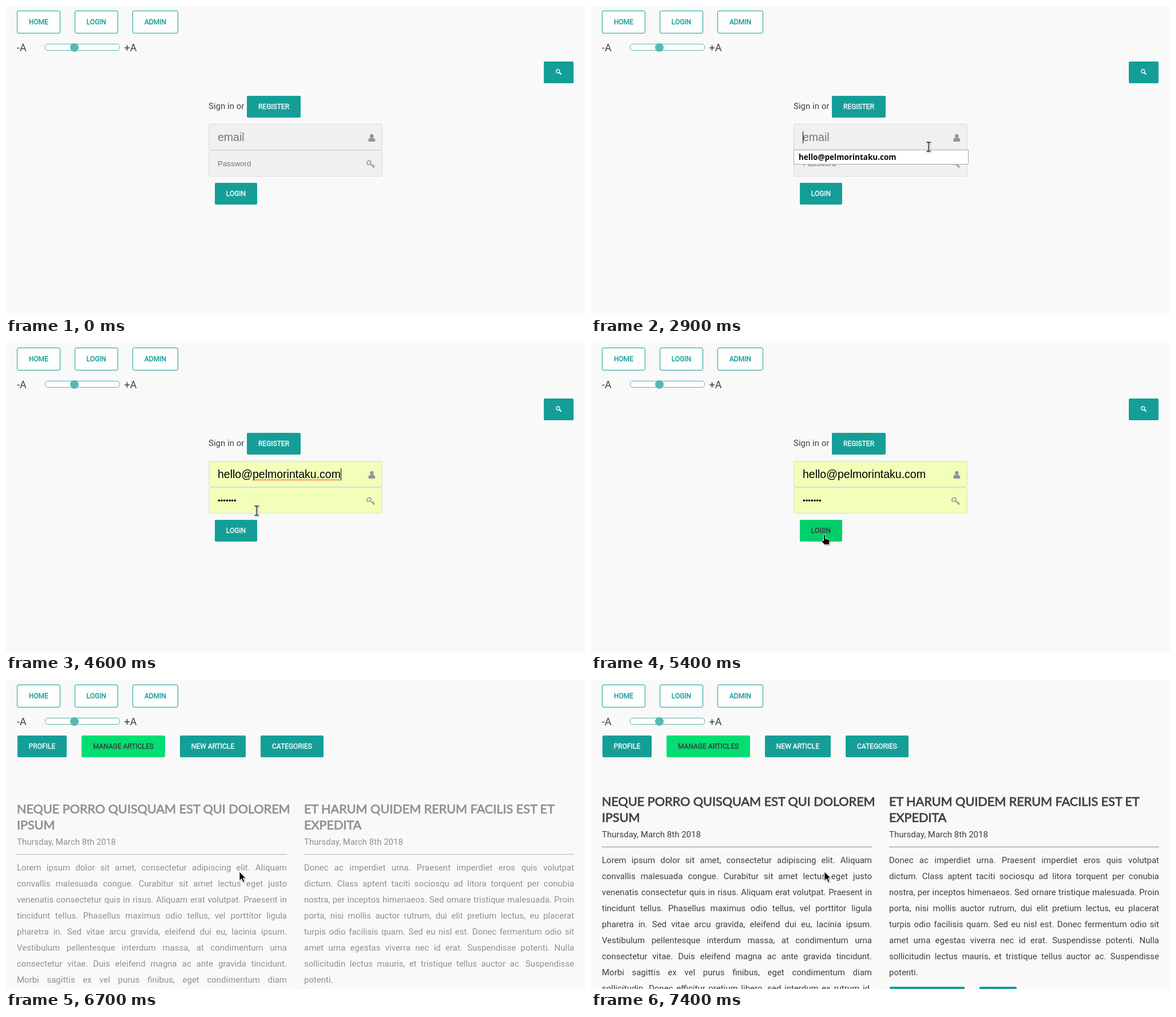
Write an HTML page that moves like this. It is 1012 px wide and 540 px high and loops after 8000 ms.

```html
<!DOCTYPE html>
<html lang="en">
<head>
<meta charset="utf-8">
<title>Sign in</title>
<style>
  :root { --teal: #159e98; --green: #02de73; --ink: #404040; }
  html, body { margin: 0; width: 100%; height: 100%; overflow: hidden; background: #f9f9f9; }
  #stage { position: relative; width: 1012px; height: 540px; overflow: hidden; background: #f9f9f9;
    font: 15px Roboto, sans-serif; color: var(--ink); }
  #stage div, #stage svg { position: absolute; box-sizing: border-box; }
  #stage svg { overflow: visible; }
  .page { left: 0; top: 0; width: 1012px; height: 540px; }
  .mid { display: flex; align-items: center; white-space: pre; }
  .btn { display: flex; align-items: center; justify-content: center; height: 38px; border-radius: 2px;
    background: var(--teal); color: #f9f9f9; font-size: 12px; white-space: pre; -webkit-text-stroke: .4px; }
  .line { height: 40px; border: 1px solid var(--teal); border-radius: 3px; background: #fefefe; color: var(--teal); }
  .active { background: var(--green); color: var(--ink); }
  .field { left: 354px; width: 304px; height: 46px; border: 1px solid #dadada; border-radius: 3px;
    padding-left: 15px; font-family: "Liberation Sans", Arial, sans-serif; }
  #list { left: 354px; top: 251px; width: 306px; height: 26px; border: 1px solid #a0a9b8; padding-left: 8px;
    font: bold 13.5px "Noto Sans", sans-serif; color: #0a0a0a; }
  #caret { top: 219px; width: 1px; height: 21px; background: #000; }
  .head { height: 28px; font: 21.6px/28px Lato, sans-serif; white-space: pre; -webkit-text-stroke: .8px; }
  .text { width: 472px; height: 28px; line-height: 28px; text-align: justify; text-align-last: justify; }
  .text.end { text-align-last: left; }
  .rule { width: 472px; height: 2px; border-top: 1px solid #9a9a9a; border-bottom: 1px solid #dedede; }
  .dot { width: 10px; height: 10px; border-radius: 50%; background: var(--teal); }
</style>
</head>
<body>
<div id="stage">
  <div class="mid" style="left:19px;top:60px;height:24px;font-size:18px">-A</div>
  <div style="left:68px;top:66px;width:131px;height:12px;border:1px solid #56b7b3;border-radius:5px;background:#fefefe"></div>
  <div style="left:112px;top:65px;width:15px;height:15px;border-radius:50%;background:#56b8b4"></div>
  <div class="mid" style="left:206.5px;top:60px;height:24px;font-size:18px">+A</div>

  <div class="page" id="login">
    <div class="mid" style="left:354px;top:163px;height:24px">Sign in or</div>
    <div class="field mid" id="mail" style="top:206px;font-size:19.5px"></div>
    <div class="field mid" id="pass" style="top:252px;font-size:13.333px"></div>
    <svg width="1012" height="540">
      <g fill="#8f979b">
        <ellipse cx="639.3" cy="227.4" rx="3.2" ry="3.6"/>
        <path d="M633.2 235.2q0-4.2 3.4-4.7q2.7 1.6 5.4 0q3.4.5 3.4 4.7q0 1.8-1.8 1.8h-8.6q-1.8 0-1.8-1.8z"/>
      </g>
      <g fill="none" stroke="#8f979b" stroke-width="1.7">
        <ellipse cx="634.3" cy="273.6" rx="3.9" ry="2.9" transform="rotate(-40 634.3 273.6)"/>
        <path d="M636.8 275.8L643.8 282.6M640.2 279l2-2M642.2 281l2-2"/>
      </g>
      <path id="wave" fill="none" stroke="#f33" stroke-width="1"/>
    </svg>
    <div class="mid" id="list">hello@pelmorintaku.com</div>
    <div id="caret"></div>
  </div>

  <div class="page" id="admin">
    <div id="spin" style="left:514px;top:375px"></div>
    <div class="page" id="news"></div>
  </div>

  <svg id="cursor" width="1" height="1" style="left:0;top:0;filter:drop-shadow(1px 1px 1px rgba(0,0,0,.3))">
    <path id="arrow" d="M0 0V15.5L3.6 12.2L6.3 18.4L8.9 17.2L6.2 11.2H11z" fill="#000" stroke="#fff" stroke-width=".9"/>
    <path id="hand" d="M-1.5 1.5a1.5 1.5 0 0 1 3 0V7l6 1.5q2 .6 1.7 2.8L8 17.5H0L-5 11.5q-.6-1.6 1.2-1.7L-1.5 11z"
      fill="#000" stroke="#fff" stroke-width=".9"/>
    <g id="beam" fill="none">
      <path d="M-3.5-8h2.5l1 1 1-1h2.5M0-7V7M-3.5 8h2.5l1-1 1 1h2.5" stroke="#fff" stroke-width="3"/>
      <path d="M-3.5-8h2.5l1 1 1-1h2.5M0-7V7M-3.5 8h2.5l1-1 1 1h2.5" stroke="#111" stroke-width="1.3"/>
    </g>
  </svg>
</div>

<script>
const LOOP = 8000, STEP = 100;
const MAIL = 'hello@pelmorintaku.com';
const $ = id => document.getElementById(id);
const show = (el, on) => { el.style.display = on ? '' : 'none'; };
const clamp = v => Math.min(1, Math.max(0, v));
const ramp = (t, a, b) => clamp((t - a) / (b - a));

function add(parent, cls, x, y, text = '', w) {
  const el = document.createElement('div');
  el.className = cls;
  el.style.left = x + 'px';
  el.style.top = y + 'px';
  if (w) el.style.width = w + 'px';
  el.textContent = text;
  parent.append(el);
  return el;
}

// Buttons
const stage = $('stage'), login = $('login'), admin = $('admin'), news = $('news');
[['HOME', 19, 76], ['LOGIN', 120, 76], ['ADMIN', 221, 80]]
  .forEach(([s, x, w]) => stage.insertBefore(add(stage, 'btn line', x, 8, s, w), login));
[['PROFILE', 20, 86], ['MANAGE ARTICLES', 132, 146], ['NEW ARTICLE', 304, 115], ['CATEGORIES', 445, 110]]
  .forEach(([s, x, w], i) => add(admin, i === 1 ? 'btn active' : 'btn', x, 97, s, w));
const register = add(login, 'btn', 421, 157, 'REGISTER', 94);
const enter = add(login, 'btn', 365, 309, 'LOGIN', 74);
const search = add(login, 'btn', 940, 97, '', 52);
search.innerHTML = '<svg width="52" height="38" fill="none" stroke="#f4fbfb">' +
  '<circle cx="24.8" cy="17" r="3" stroke-width="1.3"/><path d="M27 19.2L30.6 22.8" stroke-width="2"/></svg>';

// Articles
const articles = [
  [19, ['NEQUE PORRO QUISQUAM EST QUI DOLOREM', 'IPSUM'], [
    'Lorem ipsum dolor sit amet, consectetur adipiscing elit. Aliquam',
    'convallis malesuada congue. Curabitur sit amet lectus eget justo',
    'venenatis consectetur quis in risus. Aliquam erat volutpat. Praesent in',
    'tincidunt tellus. Phasellus maximus odio tellus, vel porttitor ligula',
    'pharetra in. Sed vitae arcu gravida, eleifend dui eu, lacinia ipsum.',
    'Vestibulum pellentesque interdum massa, at condimentum urna',
    'consectetur vitae. Duis eleifend magna ac ante gravida tincidunt.',
    'Morbi sagittis ex vel purus finibus, eget condimentum diam',
    'sollicitudin. Donec efficitur pretium libero, sed interdum ex rutrum id.']],
  [521, ['ET HARUM QUIDEM RERUM FACILIS EST ET', 'EXPEDITA'], [
    'Donec ac imperdiet urna. Praesent imperdiet eros quis volutpat',
    'dictum. Class aptent taciti sociosqu ad litora torquent per conubia',
    'nostra, per inceptos himenaeos. Sed ornare tristique malesuada. Proin',
    'porta, nisi mollis auctor rutrum, dui elit pretium lectus, eu placerat',
    'turpis odio facilisis quam. Sed eu nisl est. Donec fermentum odio sit',
    'amet urna egestas viverra nec id erat. Suspendisse potenti. Nulla',
    'sollicitudin lectus mauris, et tristique tellus auctor ac. Suspendisse',
    'potenti.']]
];
for (const [x, title, lines] of articles) {
  title.forEach((s, i) => add(news, 'head', x, 197.5 + 28 * i, s));
  add(news, 'text end', x, 256, 'Thursday, March 8th 2018');
  add(news, 'rule', x, 291);
  lines.forEach((s, i) => add(news, s === 'potenti.' ? 'text end' : 'text', x, 301 + 28 * i, s));
}
add(news, 'btn', 522, 536, '', 131);
add(news, 'btn', 679, 536, '', 65);

// Spinner dots and spelling mark
const dots = [0, 1, 2, 3].map(() => add($('spin'), 'dot', -5, -5));
let wave = 'M431 240';
for (let x = 433, up = true; x <= 585; x += 2, up = !up) wave += `L${x} ${up ? 238.5 : 240}`;
$('wave').setAttribute('d', wave);

// time, x, y of the hot spot, pointer shape
const path = [
  [900, 488, 6, 'arrow'], [1300, 474, 165, 'hand'], [1500, 463, 188, 'hand'], [1600, 456, 201, 'arrow'],
  [1700, 449, 216, 'beam'], [1800, 447, 227, 'beam'], [1900, 447, 227, 'beam'], [2000, 500, 262, 'beam'],
  [2100, 575, 252, 'beam'], [2200, 613, 240, 'beam'], [2600, 613, 240, 'beam'], [2900, 590, 246, 'beam'],
  [3100, 590, 246, 'beam'], [3200, 575, 252, 'arrow'], [3400, 520, 260, 'arrow'], [3900, 438, 271, 'arrow'],
  [4200, 438, 271, 'beam'], [4600, 438, 293, 'beam'], [4700, 436, 303, 'arrow'], [4800, 428, 316, 'hand'],
  [5000, 408, 335, 'hand'], [5900, 408, 335, 'arrow'], [LOOP, 408, 335, 'arrow']
];

function moveCursor(t) {
  show($('cursor'), t >= path[0][0]);
  if (t < path[0][0]) return;
  const i = path.findIndex(k => k[0] > t);
  const a = path[i - 1], b = path[i], f = (t - a[0]) / (b[0] - a[0]);
  const at = n => Math.round(a[n] + (b[n] - a[n]) * f);
  $('cursor').style.transform = `translate(${at(1)}px,${at(2)}px)`;
  for (const id of ['arrow', 'hand', 'beam']) show($(id), id === a[3]);
}

const mix = (a, b, f) => `rgb(${a.map((v, i) => Math.round(v + (b[i] - v) * f))})`;
function hover(el, f, dim = 1) {
  el.style.background = mix([21, 158, 152], [2, 222, 115], f);
  el.style.color = mix([249, 249, 249], [64, 64, 64], f);
  el.style.filter = dim < 1 ? `brightness(${dim})` : '';
}

function drawLogin(t) {
  const filled = t >= 3300, done = t >= 4200;
  const mail = $('mail'), pass = $('pass'), list = $('list'), caret = $('caret');
  mail.textContent = filled ? MAIL : 'email';
  pass.textContent = filled ? '•'.repeat(7) : 'Password';
  for (const el of [mail, pass]) {
    el.style.background = filled ? '#f1ffb8' : '#f0f0f0';
    el.style.color = filled ? '#000' : '#757575';
  }
  show(list, t >= 2700 && !done);
  list.style.background = filled ? '#a4bdea' : '#fff';
  show(caret, t >= 2600 && t < 5200);
  caret.style.left = (done ? 585 : 370) + 'px';
  show($('wave'), done && t < 5200);
  hover(register, ramp(t, 1200, 1500) * (1 - ramp(t, 1500, 1800)));
  const press = ramp(t, 5100, 5300) * (1 - ramp(t, 5300, 5600));
  hover(enter, ramp(t, 4700, 5000), 1 - .1 * press);
}

function drawAdmin(t) {
  show($('spin'), t < 6600);
  const phase = (Math.min(t, 6400) - 6000) / 800;
  const reach = 14.7 * (1 - .4 * Math.sin(Math.PI * phase) ** 2);
  dots.forEach((d, i) => {
    const a = Math.PI * (.25 + i / 2 + phase);
    d.style.transform = `translate(${reach * Math.cos(a)}px,${reach * Math.sin(a)}px)`;
  });
  // critically damped spring
  const s = Math.max(0, t - 6555) * .013;
  const left = (1 + s) * Math.exp(-s);
  news.style.opacity = left < .005 ? 1 : 1 - left;
  news.style.transform = `translateY(${Math.round(30 * left)}px)`;
}

function frame() {
  const t = Math.floor(performance.now() % LOOP / STEP) * STEP;
  show(login, t < 5900);
  show(admin, t >= 5900);
  if (t < 5900) drawLogin(t); else drawAdmin(t);
  moveCursor(t);
  requestAnimationFrame(frame);
}
frame();
</script>
</body>
</html>
```
